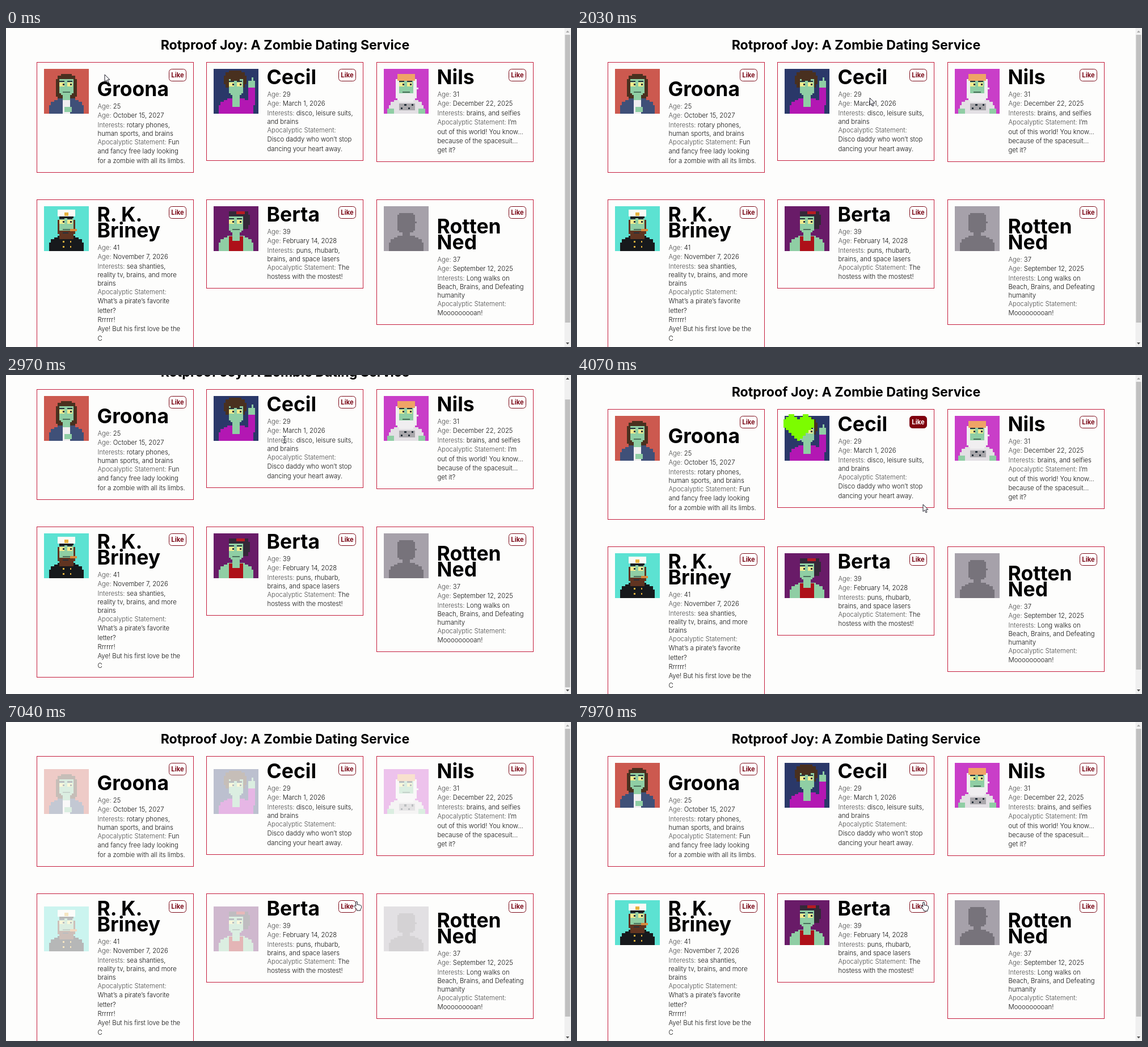
An HTML page for the animation above (8000 ms loop, 996 by 562 pixels).

```html
<!DOCTYPE html>
<html lang="en">
<head>
<meta charset="utf-8">
<title>Zombie Dating Service</title>
<style>
html, body { margin: 0; width: 100%; height: 100%; overflow: hidden; background: #fdfdfc; }
svg { display: block; width: 100%; height: 100%; font-family: Inter, "Open Sans", sans-serif; }
.title { font-size: 23.2px; font-weight: 700; text-anchor: middle; }
.name { font-size: 35.5px; font-weight: 700; }
.line { font-size: 11.3px; font-weight: 300; fill: #111; }
.label { fill: #4c4c4c; }
.card { fill: none; stroke: #c41c3c; }
.like rect { fill: #fff; stroke: #7b0a18; }
.like text { font-size: 11.2px; font-weight: 700; text-anchor: middle; fill: #7b0a18; }
.like.on rect { fill: #80000d; }
.like.on text { fill: #fff; }
.pixels { shape-rendering: crispEdges; }
.cursor { fill: #fff; stroke: #1c1c28; stroke-linejoin: round; }
</style>
</head>
<body>
<svg id="stage" viewBox="0 0 996 562" preserveAspectRatio="none"></svg>
<script>
const LOOP = 8000;
const RESET = 6660, FADE = 1270, PULSE = 650;
const NS = 'http://www.w3.org/2000/svg';
const stage = document.getElementById('stage');

function add(parent, tag, attrs = {}, text) {
  const el = document.createElementNS(NS, tag);
  for (const k in attrs) el.setAttribute(k, attrs[k]);
  if (text !== undefined) el.textContent = text;
  parent.appendChild(el);
  return el;
}

// Pixel art on a grid of 26 cells.
const GRID = 26, CELL = 79 / GRID;
const SKIN = '#8fcea4', EYE = '#f3ec8e', INK = '#26303a';

function pen(g) {
  const box = (fill, x, y, width, height) => add(g, 'rect', { fill, x, y, width, height });
  // Rounded block, cut into whole cells row by row.
  const blob = (fill, cx, cy, rx, ry) => {
    let d = '';
    for (let y = 0; y < GRID; y++) {
      const v = Math.abs(y + 0.5 - cy) / ry;
      if (v >= 1) continue;
      const half = rx * Math.cbrt(1 - v ** 3);
      const left = Math.round(cx - half);
      d += `M${left} ${y}H${Math.round(cx + half)}v1H${left}z`;
    }
    add(g, 'path', { d, fill });
  };
  return { box, blob };
}

function drawFace(g, { bg, body, skin = SKIN, back, front }) {
  const p = pen(g);
  p.box(bg, 0, 0, GRID, GRID);
  if (back) back(p);
  p.blob(body, 13, 26, 10, 9);
  p.box(skin, 11, 14, 4, 4);
  p.blob(skin, 13, 10, 4.4, 5.4);
  if (!front) return;
  for (const x of [9, 13.5]) {
    p.box(INK, x, 7, 3, 0.7);
    p.box(EYE, x, 8, 3, 2.3);
    p.box(INK, x + 1.7, 8.7, 1, 1);
  }
  p.box('#4b705c', 11, 13, 4, 0.7);
  front(p);
}

const HAIR = '#49301f', WHITE = '#f0eef0';
const faces = {
  lady: {
    bg: '#cc594f', body: '#3f5078',
    back: p => p.blob(HAIR, 13, 11, 6, 8),
    front: p => {
      p.box(HAIR, 9, 4, 8, 2);
      p.box(WHITE, 11, 18, 4, 8);
      p.box(SKIN, 12, 22, 4, 3);
    }
  },
  dancer: {
    bg: '#2a3869', body: '#b317b3',
    back: p => {
      p.blob(HAIR, 12.5, 6.5, 6.2, 5.3);
      p.box('#b317b3', 20, 11, 4, 10);
      p.box(SKIN, 20, 7, 4, 4);
      p.box(SKIN, 22, 5, 1, 2);
    },
    front: p => {
      p.blob(HAIR, 12.5, 4, 5.5, 2.6);
      p.blob(SKIN, 13, 17, 2.4, 5);
    }
  },
  astro: {
    bg: '#c93ec8', body: '#e3e0e4',
    back: p => p.blob(WHITE, 13, 11.5, 6.5, 7.5),
    front: p => {
      p.blob('#efa466', 13, 5, 5.5, 2);
      p.blob(WHITE, 13, 16.5, 4.6, 2.6);
      p.box('#a9a7ab', 9, 20, 9, 4);
      for (let x = 10; x < 17; x += 2) p.box(INK, x, 20.5 + x % 4, 1, 1);
      for (const x of [2, 20]) p.box(SKIN, x, 23, 4, 3);
    }
  },
  sailor: {
    bg: '#5ce2d2', body: '#17191c',
    back: p => p.blob('#603421', 13, 12, 5.4, 6),
    front: p => {
      p.blob('#603421', 13, 16.5, 4, 3);
      p.box(INK, 11, 15, 3, 0.7);
      p.box('#d88a3c', 15, 13, 4, 1.5);
      p.blob('#fbfaf6', 13, 4, 5.4, 2.3);
      p.box('#17191c', 9, 6, 8, 1);
      p.box('#e7b23e', 12, 3.5, 2, 2);
      for (const y of [20, 23]) for (const x of [11, 15]) p.box('#e7b23e', x, y, 0.7, 1);
    }
  },
  host: {
    bg: '#691b68', body: SKIN,
    back: p => p.blob('#342838', 15, 8, 6, 5.5),
    front: p => {
      p.blob('#342838', 13, 4.3, 4.5, 1.6);
      p.box('#b61c22', 13, 3, 5, 1.6);
      p.box('#ae1119', 9, 20, 8, 6);
      for (const x of [9, 15]) p.box('#ae1119', x, 17.5, 2, 3);
    }
  },
  blank: {
    bg: '#a6a1aa', body: '#77737b', skin: '#77737b',
    back: p => p.blob('#77737b', 13, 9.5, 5.5, 6)
  }
};

// A leading "~" marks a tighter line step; low names sit below the button.
const cards = [
  { face: 'lady', name: ['Groona'], low: true, lines: [
    'Age: 25', 'Age: October 15, 2027', 'Interests: rotary phones,', '~human sports, and brains',
    '~Apocalyptic Statement: Fun', 'and fancy free lady looking', 'for a zombie with all its limbs.'] },
  { face: 'dancer', name: ['Cecil'], like: 3700, lines: [
    'Age: 29', 'Age: March 1, 2026', 'Interests: disco, leisure suits,', '~and brains',
    '~Apocalyptic Statement:', 'Disco daddy who won’t stop', 'dancing your heart away.'] },
  { face: 'astro', name: ['Nils'], lines: [
    'Age: 31', 'Age: December 22, 2025', 'Interests: brains, and selfies', 'Apocalyptic Statement: I’m',
    'out of this world! You know...', 'because of the spacesuit...', 'get it?'] },
  { face: 'sailor', name: ['R. K.', 'Briney'], lines: [
    'Age: 41', 'Age: November 7, 2026', 'Interests: sea shanties,', '~reality tv, brains, and more', '~brains',
    '~Apocalyptic Statement:', 'What’s a pirate’s favorite', 'letter?', 'Rrrrrr!',
    'Aye! But his first love be the', 'C'] },
  { face: 'host', name: ['Berta'], like: 5050, lines: [
    'Age: 39', 'Age: February 14, 2028', 'Interests: puns, rhubarb,', '~brains, and space lasers',
    '~Apocalyptic Statement: The', 'hostess with the mostest!'] },
  { face: 'blank', name: ['Rotten', 'Ned'], low: true, lines: [
    'Age: 37', 'Age: September 12, 2025', 'Interests: Long walks on', '~Beach, Brains, and Defeating', '~humanity',
    '~Apocalyptic Statement:', 'Mooooooooan!'] }
];

function heartPath() {
  let d = '';
  for (let x = 0; x < 11; x++) {
    const off = Math.abs(x - 5);
    d += `M${x} ${Math.floor(Math.abs(off - 2.5))}h1V${10 - off}h-1z`;
  }
  return d;
}

function drawLine(parent, y, str) {
  const [, label, rest] = str.match(/^((?:Age|Interests|Apocalyptic Statement):)?(.*)$/);
  const el = add(parent, 'text', { class: 'line', x: 107, y });
  if (label) add(el, 'tspan', { class: 'label' }, label);
  add(el, 'tspan', {}, rest);
}

function drawCard(page, c, i) {
  const x = Math.floor(54.3 + 299.4 * (i % 3)) + 0.5;
  const y = i < 3 ? 60.5 : 302.5;
  const drop = c.low ? 21 : 0;
  const g = add(page, 'g', { transform: `translate(${x} ${y})` });

  c.pic = add(g, 'g', { class: 'pixels' });
  drawFace(add(c.pic, 'g', { transform: `scale(${CELL})` }), faces[c.face]);
  c.name.forEach((n, k) => add(g, 'text', { class: 'name', x: 106, y: 38.5 + drop + k * 28 }, n));

  let base = 60.5 + drop + 28 * (c.name.length - 1);
  c.lines.forEach((s, k) => {
    if (k) base += s[0] === '~' ? 15 : 16.4;
    drawLine(g, base, s.replace('~', ''));
  });
  add(g, 'rect', { class: 'card', width: 276, height: Math.round(base + 16.5) });

  c.button = add(g, 'g', { class: 'like' });
  add(c.button, 'rect', { x: 233, y: 12, width: 30, height: 21, rx: 5 });
  add(c.button, 'text', { x: 248, y: 26.6 }, 'Like');
  c.heart = add(g, 'path', { class: 'pixels', d: heartPath(), fill: '#7cfc00' });
}

const page = add(stage, 'g');
add(page, 'text', { class: 'title', x: 492, y: 38 }, 'Rotproof Joy: A Zombie Dating Service');
cards.forEach((c, i) => drawCard(page, c, i));

add(stage, 'rect', { x: 984.5, width: 11.5, height: 562, fill: '#f0f0f0' });
const thumb = add(stage, 'rect', { x: 985.5, width: 9, height: 507, fill: '#c0c0c0' });
const upArrow = add(stage, 'path', { d: 'M987 8l3-3.5 3 3.5z' });
add(stage, 'path', { d: 'M987 554l3 3.5 3-3.5z', fill: '#505050' });

const shapes = {
  arrow: 'M0 0v12.5l2.9-2.6 2.1 4.6 2-.9-2-4.5h3.9z',
  beam: 'M-3-5h2l1 1 1-1h2M0-4v10M-3 7h2l1-1 1 1h2',
  hand: 'M-1.3 1q1.3-1.6 2.6 0v5l1.5-.5 1.2.8 1.6-.2 1 1 1.3.1.6 1.3v3l-1.6 3v1.6h-6.4v-1.4l-3.4-4.4-1.6-2q.8-1.8 2.2-.6l1 1z'
};
const cursor = add(stage, 'path', { class: 'cursor' });

// time, x, y, shape
const track = [
  [0, 174, 82, 'arrow'], [1160, 609, 161, 'arrow'], [2400, 491, 113, 'beam'],
  [3000, 491, 113, 'beam'], [3500, 606, 84, 'hand'], [4070, 610, 228, 'arrow'],
  [4700, 617, 324, 'hand'], [6000, 617, 324, 'hand'], [7040, 618, 316, 'hand'],
  [LOOP, 611, 317, 'hand']
];

const unit = v => Math.max(0, Math.min(1, v));
const smooth = v => { v = unit(v); return v * v * (3 - 2 * v); };
const mix = (a, b, p) => a + (b - a) * p;

function drawCursor(t) {
  const i = track.findIndex(k => k[0] > t) - 1;
  const [t0, x0, y0, kind] = track[i], [t1, x1, y1] = track[i + 1];
  const p = smooth((t - t0) / (t1 - t0));
  cursor.setAttribute('d', shapes[kind]);
  cursor.setAttribute('transform', `translate(${mix(x0, x1, p)} ${mix(y0, y1, p)})`);
  cursor.style.fill = kind === 'beam' ? 'none' : '#fff';
}

function render(t) {
  const scroll = Math.round(36 * (smooth((t - 2400) / 260) - smooth((t - 2950) / 280)));
  page.setAttribute('transform', `translate(0 ${-scroll})`);
  thumb.setAttribute('y', 12 + scroll * 0.89);
  upArrow.setAttribute('fill', scroll > 0 ? '#505050' : '#a8a8a8');

  const shown = t < RESET ? 1 : unit((t - RESET) / FADE);
  for (const c of cards) {
    c.pic.setAttribute('opacity', shown);
    c.pic.setAttribute('transform', `translate(12.5 ${11.5 + 16 * (1 - shown)})`);
    const on = t >= c.like && t < RESET;
    c.button.setAttribute('class', on ? 'like on' : 'like');
    c.heart.setAttribute('visibility', on ? 'visible' : 'hidden');
    if (on) {
      const size = 2 + 3 * Math.sin(Math.PI * unit((t - c.like) / PULSE));
      c.heart.setAttribute('transform', `translate(10 8.5) scale(${size} ${size * 0.96})`);
    }
  }
  drawCursor(t);
}

const start = performance.now();
function tick() {
  render((performance.now() - start) % LOOP);
  requestAnimationFrame(tick);
}
render(0);
requestAnimationFrame(tick);
</script>
</body>
</html>
```
